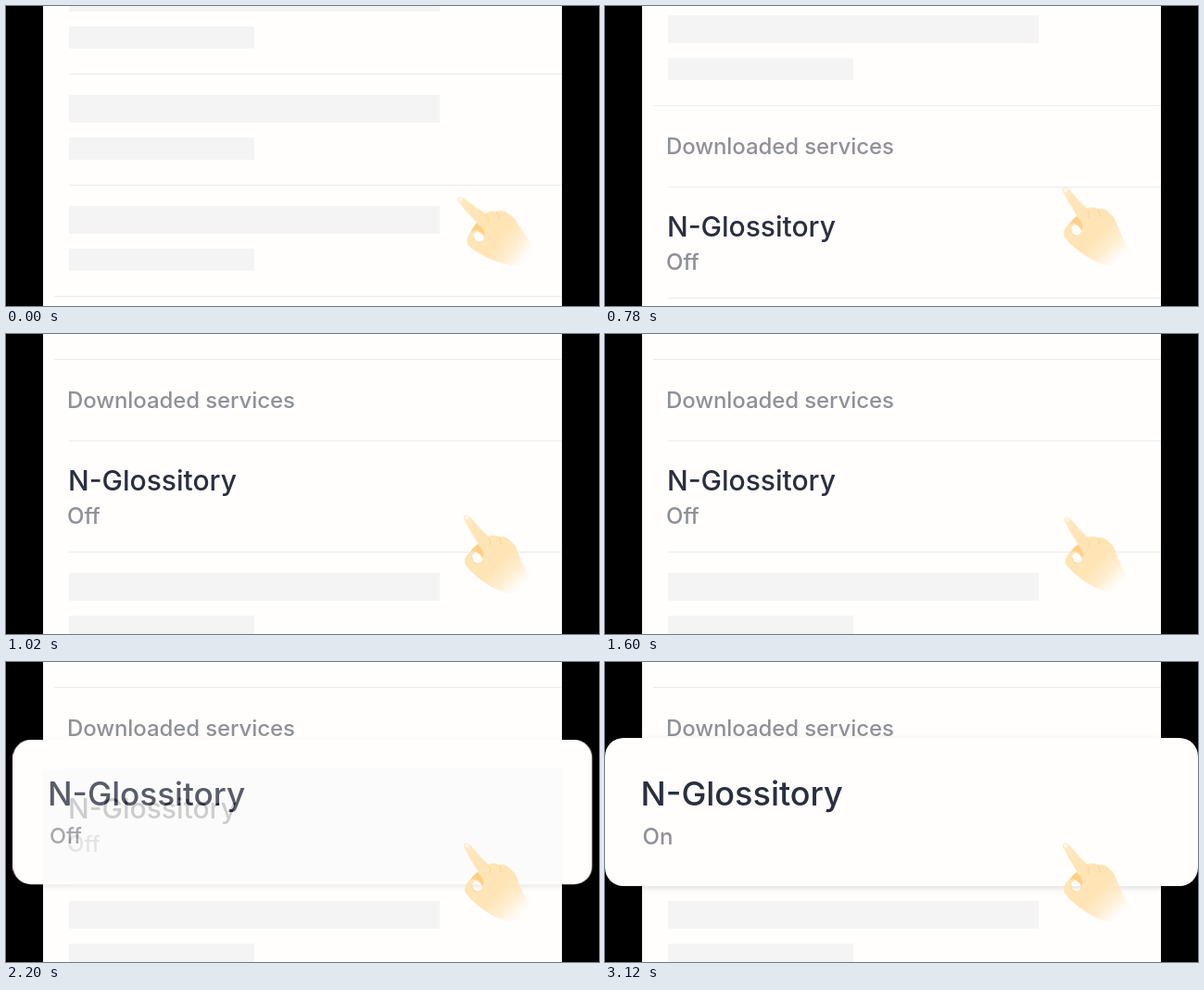
These frames come from a looping animation (640x324 px, 3.4 s). An HTML page:

```html
<!DOCTYPE html>
<html lang="en">
<head>
<meta charset="utf-8">
<title>Enable a downloaded service</title>
<style>
  html, body { margin: 0; width: 100%; height: 100%; overflow: hidden; background: #000; }
  svg { display: block; width: 640px; height: 324px; }
  text { font-family: Inter, "Open Sans", sans-serif; font-size: 24px; font-weight: 500; fill: #909196; }
  .paper { fill: #fffefd; }
  .bar { fill: #f4f4f4; }
  .line { fill: #ebebeb; }
  .head { letter-spacing: -.1px; }
  .title { font-size: 30px; fill: #2b2f3e; }
  .card .title { font-size: 36px; }
  .shadow { filter: drop-shadow(0 2px 3px rgba(0, 0, 0, .13)); }

  .page, .press, .card, .backing, .fade, .off, .on, .turn, .tap {
    animation: 3400ms linear infinite both;
  }
  .page { animation-name: scroll; }
  .press { animation-name: press; }
  .card, .backing { animation-name: grow; transform-origin: 320px 162px; }
  .fade { animation-name: fade; }
  .solid { animation: solid 3400ms step-end infinite both; }
  .off { animation-name: off; }
  .on { animation-name: on; }
  .turn { animation-name: turn; transform-origin: 546px 237px; }
  .tap { animation-name: tap; transform-origin: 528px 237px; }

  @keyframes scroll {
    0%, 15.294% { transform: translateY(0); animation-timing-function: cubic-bezier(.4, 0, .34, 1); }
    30%, 100% { transform: translateY(-286px); }
  }
  @keyframes press {
    0%, 57.059% { opacity: 0; }
    60.588%, 100% { opacity: 1; }
  }
  @keyframes grow {
    0%, 57.059% { transform: scale(.9); }
    67.059%, 100% { transform: scale(1); }
  }
  @keyframes fade {
    0%, 57.059% { opacity: 0; }
    67.059%, 100% { opacity: 1; }
  }
  @keyframes solid {
    0% { visibility: hidden; }
    62.059%, 100% { visibility: visible; }
  }
  @keyframes off {
    0%, 74.706% { opacity: 1; transform: translateY(0); }
    83%, 100% { opacity: 0; transform: translateY(-7px); }
  }
  @keyframes on {
    0%, 76% { opacity: 0; transform: translateY(11px); animation-timing-function: ease-out; }
    91.47%, 100% { opacity: 1; transform: translateY(0); }
  }
  @keyframes turn {
    0% { transform: rotate(-11.5deg); }
    18.235% { transform: rotate(-3.4deg); animation-timing-function: ease-out; }
    24.706%, 100% { transform: rotate(0); }
  }
  @keyframes tap {
    0%, 38.235% { transform: scale(1); animation-timing-function: ease-in-out; }
    44.118% { transform: scale(.9); animation-timing-function: ease-in-out; }
    50%, 100% { transform: scale(1); }
  }
</style>
</head>
<body>
<svg viewBox="0 0 640 324">
  <defs>
    <clipPath id="screen"><rect x="40" width="560" height="324"/></clipPath>
    <linearGradient id="skin" gradientUnits="userSpaceOnUse" x1="531" y1="247" x2="557" y2="273">
      <stop stop-color="#ffe4b5"/>
      <stop offset=".5" stop-color="#ffe6bb" stop-opacity=".7"/>
      <stop offset="1" stop-color="#ffecca" stop-opacity="0"/>
    </linearGradient>
    <linearGradient id="finger" gradientUnits="userSpaceOnUse" x1="495" y1="196" x2="520" y2="226">
      <stop stop-color="#ffeccb"/>
      <stop offset=".3" stop-color="#ffe6bc"/>
      <stop offset="1" stop-color="#ffe4b5"/>
    </linearGradient>
    <!-- placeholder row, measured from the line above it -->
    <g id="row">
      <rect class="line" x="68" width="532" height="1"/>
      <rect class="bar" x="68" y="23" width="400" height="30"/>
      <rect class="bar" x="68" y="69" width="200" height="24"/>
    </g>
  </defs>

  <!-- part of the card that reaches past the screen -->
  <g class="solid"><rect class="backing paper" y="82" width="640" height="160" rx="20"/></g>

  <g clip-path="url(#screen)">
    <rect class="paper" x="40" width="560" height="324"/>
    <g class="page">
      <use href="#row" y="-47"/>
      <use href="#row" y="73"/>
      <use href="#row" y="193"/>
      <rect class="line" x="52" y="313" width="548" height="1"/>
      <text class="head" x="66" y="366">Downloaded services</text>
      <rect class="press" x="40" y="402" width="560" height="120" fill="#f3f3f4"/>
      <rect class="line" x="68" y="401" width="532" height="1"/>
      <text class="title" x="67" y="455">N-Glossitory</text>
      <text x="66" y="491">Off</text>
      <use href="#row" y="521"/>
    </g>
    <g class="fade">
      <g class="card">
        <rect class="paper shadow" y="82" width="640" height="160" rx="20"/>
        <text class="title" x="38.5" y="155">N-Glossitory</text>
        <text class="off" x="40.5" y="197">Off</text>
        <text class="on" x="40.5" y="197">On</text>
      </g>
    </g>
  </g>

  <g class="turn"><g class="tap">
    <path fill="url(#skin)" fill-rule="evenodd" d="M505 213L520 219Q526 215.500 532 219Q540 218 545 224Q551 229 554 240L565 264L548 282Q530 278 516 268Q503 259 495.500 249Q494 242 499 237Q504 231 510 226Z
      M503 240Q502 246 508 247.500Q514 247 514 242Q511 237 507 236Q504 237 503 240Z"/>
    <path fill="#fdd084" d="M509 227Q503 231 501.500 236Q504 233 508 235Q513 238 514 242Q517 238 514 233Z"/>
    <path fill="url(#finger)" d="M494 199.500Q493 196 496.500 195.500Q500 196 504 201Q512 211 521 219Q522 227 516 232Q511 229 508 224Q500 212 494 199.500Z"/>
    <path fill="none" stroke="#f9d698" stroke-width="1" stroke-linecap="round" d="M521 220Q524 224 522 229M532 219.500Q535 223 534 227M503 241Q502.500 246.500 508 248"/>
    <path fill="#fff8ee" d="M495 197Q498 196 500 199L498 201Q495.500 200 495 197Z"/>
  </g></g>
</svg>
</body>
</html>
```
